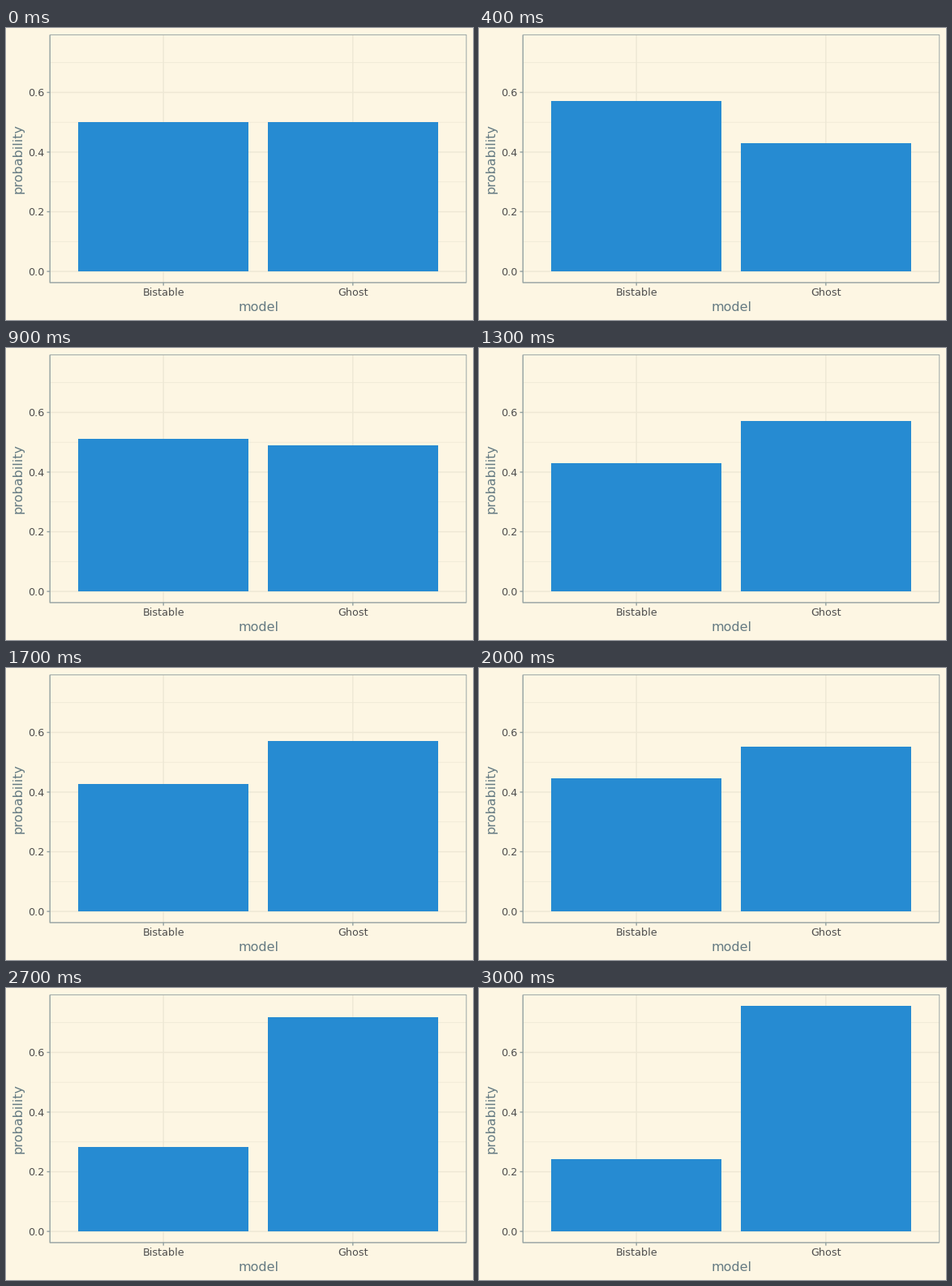
Write a matplotlib script that moves like this. It is 576x360 px and loops after 8 s.

```python
import numpy as np
import matplotlib.pyplot as plt
from matplotlib.animation import FuncAnimation
from matplotlib.patches import Rectangle

WIDTH, HEIGHT, DPI = 576, 360, 100
PT = 72 / DPI  # points per pixel

PAPER, GRID, AXIS = "#fdf6e3", "#eee8d5", "#93a1a1"
BAR, TITLE, LABEL = "#268bd2", "#657b83", "#4d4d4d"

LEFT, RIGHT, TOP, BOTTOM = 54.2, 567.8, 8.4, 313.9
ZERO, UNIT = 300.1, 367.8
CENTERS = {"Bistable": 194.2, "Ghost": 427.8}
BAR_WIDTH = 210.2

# Probability of the first model at a few animation steps
STEPS = [0, 4, 6, 9, 13, 15, 20, 24, 27, 30]
PROBS = [0.5, 0.571, 0.600, 0.5115, 0.430, 0.416, 0.447, 0.319, 0.282, 0.2435]

plt.rcParams["font.family"] = "DejaVu Sans"
fig = plt.figure(figsize=(WIDTH / DPI, HEIGHT / DPI), dpi=DPI, facecolor=PAPER)
ax = fig.add_axes([0, 0, 1, 1])
ax.set_xlim(0, WIDTH)
ax.set_ylim(HEIGHT, 0)
ax.axis("off")


def y_of(prob):
    return ZERO - UNIT * prob


def line(xs, ys, color, width, z):
    ax.plot(xs, ys, color=color, lw=width * PT, zorder=z, snap=False,
            solid_capstyle="butt")


def text(x, y, s, size, color, ha="center", **kw):
    ax.text(x, y, s, fontsize=size * PT, color=color, ha=ha,
            va="baseline", **kw)


for prob in (0.1, 0.3, 0.5, 0.7):
    line([LEFT, RIGHT], [y_of(prob)] * 2, GRID, 0.75, 1)

for prob in (0.0, 0.2, 0.4, 0.6):
    y = y_of(prob)
    line([LEFT, RIGHT], [y, y], GRID, 1.45, 1)
    line([LEFT - 3.7, LEFT], [y, y], AXIS, 1.4, 4)
    text(47.2, y + 4.6, f"{prob:.1f}", 12.8, LABEL, ha="right")

bars = []
for name, x in CENTERS.items():
    line([x, x], [TOP, BOTTOM], GRID, 1.45, 1)
    line([x, x], [BOTTOM, BOTTOM + 3.7], AXIS, 1.4, 4)
    text(x, 330.2, name, 12.8, LABEL)
    bar = Rectangle((x - BAR_WIDTH / 2, ZERO), BAR_WIDTH, 0,
                    facecolor=BAR, linewidth=0, zorder=2)
    bars.append(ax.add_patch(bar))

line([LEFT, RIGHT, RIGHT], [TOP, TOP, BOTTOM], AXIS, 0.9, 3)
line([LEFT, LEFT, RIGHT], [TOP, BOTTOM, BOTTOM], AXIS, 1.4, 4)
text(311, 349, "model", 16, TITLE)
ax.text(20, 161, "probability", fontsize=16 * PT, color=TITLE, rotation=90,
        rotation_mode="anchor", ha="center", va="baseline")


def update(step):
    first = np.interp(step, STEPS, PROBS)
    for bar, prob in zip(bars, (first, 1 - first)):
        bar.set_height(-UNIT * prob)
    return bars


anim = FuncAnimation(fig, update, frames=80, interval=100,
                     repeat=True, repeat_delay=0, blit=False)
plt.show()
```
